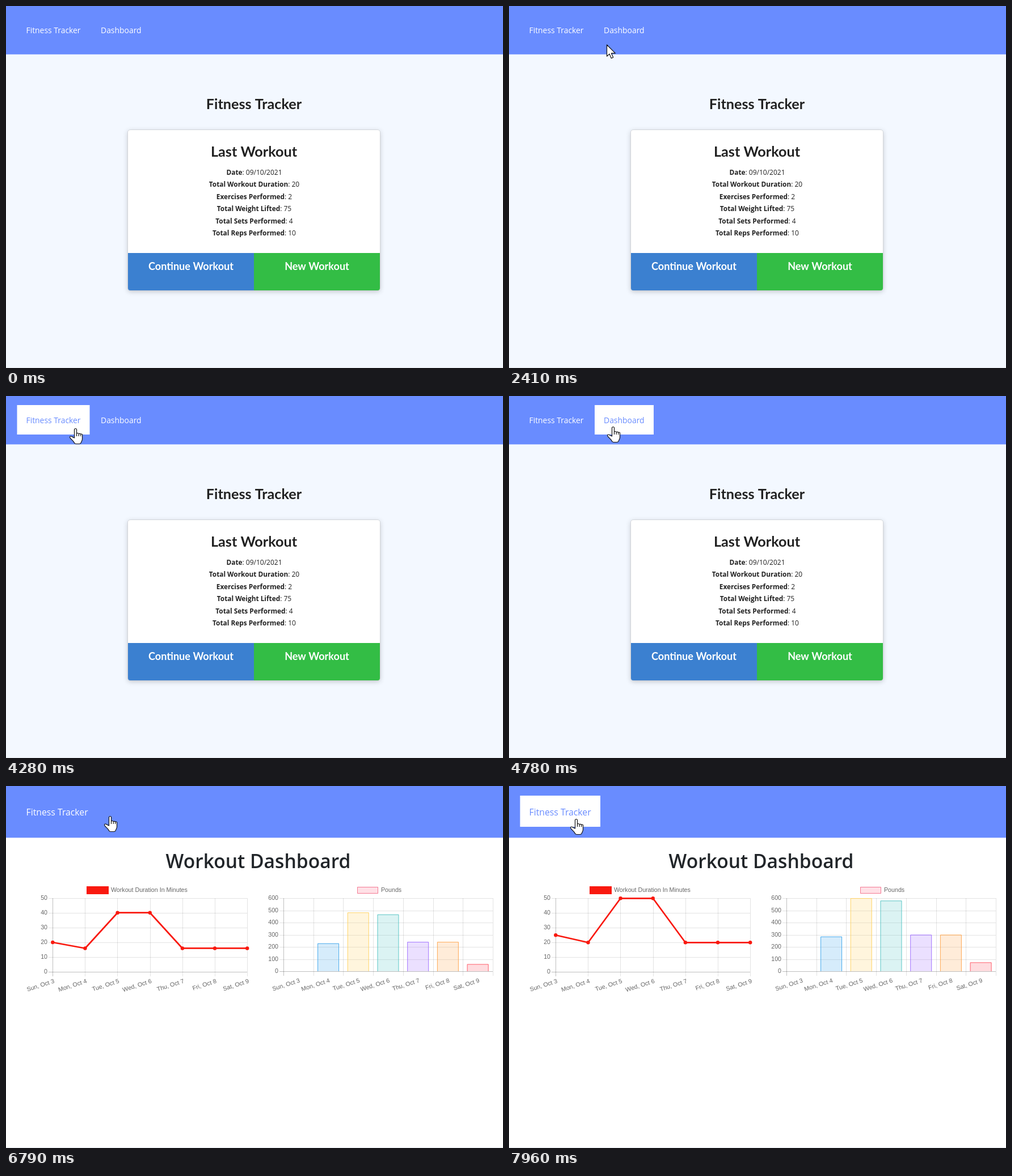
An HTML page with a canvas for the animation above (8 s loop, 876 px wide and 639 px high).

```html
<!DOCTYPE html>
<html lang="en">
<head>
<meta charset="utf-8">
<title>Fitness Tracker</title>
<style>
  html, body { margin: 0; width: 100%; height: 100%; overflow: hidden; }
  canvas { display: block; }
</style>
</head>
<body>
<canvas id="stage" width="876" height="639"></canvas>
<script>
const ctx = document.getElementById('stage').getContext('2d');
const LOOP = 8000, DASHBOARD_AT = 5900, CHARTS_AT = 6430, GROW_AT = 6445, GROW_MS = 1000;
const BLUE = '#698cff', INK = '#212121';
const SANS = '"Open Sans", sans-serif', LATO = 'Lato, sans-serif';
const CHART_FONT = '10.67px "Liberation Sans", Arial, sans-serif';

// The screen refreshes in bursts: first update, last update, number of updates
const BURSTS = [
  [250, 1000, 12], [1070, 1600, 7], [1930, 2410, 7], [2480, 2680, 4], [2750, 3150, 7],
  [3480, 3750, 4], [3950, 4210, 2], [4210, 4780, 9], [6430, 7200, 12], [7270, 7960, 10]
];
// Pointer stops: time, x, y
const POINTER = [
  [250, 802, 622], [460, 632, 482], [860, 322, 421], [1000, 233, 401],
  [1160, 175, 379], [1300, 139, 420], [1420, 148, 476], [1600, 170, 396],
  [1860, 170, 396], [2240, 188, 115], [2410, 172, 68], [2480, 165, 55],
  [2600, 125, 40], [2680, 125, 38], [2820, 165, 34], [2950, 165, 32],
  [3150, 116, 38], [3410, 116, 38], [3480, 115, 25], [3750, 114, 57],
  [3950, 115, 57], [4140, 115, 57], [4780, 183, 54],
  [6360, 183, 54], [6430, 183, 53], [7200, 183, 53], [7500, 145, 60], [7960, 118, 58]
];
const ARROW = new Path2D('M.5 .5V20.8L5 16.6L8.3 24.2L11.7 22.7L8.4 15.4H15.3Z');
const HAND = new Path2D('M8.5 17V2.5a2 2 0 0 1 4 0V9.5a2 2 0 0 1 3.7 .6a2 2 0 0 1 3.5 .9a1.5 1.5 0 0 1 2.8 1.2V19c0 3-1.6 4-2.3 6.5q-1 2-3 2H11q-2 0-3-2.5C6.6 22 3.5 20.5 .8 16.6c-1-2 1.2-3.4 3-2Z');
const KNUCKLES = new Path2D('M12.5 9.5V14M16.2 10.5V14M19.7 11.5V14');

const STATS = [
  ['Date', '09/10/2021'], ['Total Workout Duration', 20], ['Exercises Performed', 2],
  ['Total Weight Lifted', 75], ['Total Sets Performed', 4], ['Total Reps Performed', 10]
];
const DAYS = ['Sun', 'Mon', 'Tue', 'Wed', 'Thu', 'Fri', 'Sat'].map((day, i) => `${day}, Oct ${i + 3}`);
const MINUTES = [25, 20, 50, 50, 20, 20, 20];
const POUNDS = [0, 285, 600, 580, 300, 300, 73];
const BAR_RGB = ['255,99,132', '54,162,235', '255,206,86', '75,192,192', '153,102,255', '255,159,64', '255,80,95'];

function rect(x, y, w, h, fill) {
  ctx.fillStyle = fill;
  ctx.fillRect(x, y, w, h);
}

function text(str, x, y, font, fill, align = 'left', baseline = 'alphabetic') {
  ctx.font = font;
  ctx.fillStyle = fill;
  ctx.textAlign = align;
  ctx.textBaseline = baseline;
  ctx.fillText(str, x, y);
}

function line(x1, y1, x2, y2, color) {
  ctx.strokeStyle = color;
  ctx.lineWidth = 1;
  ctx.beginPath();
  ctx.moveTo(x1, y1);
  ctx.lineTo(x2, y2);
  ctx.stroke();
}

const inside = (p, x, y, w, h) => p && p.x >= x && p.x < x + w && p.y >= y && p.y < y + h;

// Time of the latest screen refresh
function refreshTime(t) {
  const burst = BURSTS.findLast(([first]) => first <= t);
  if (!burst) return 0;
  const [first, last, count] = burst, gap = (last - first) / (count - 1);
  return first + gap * Math.min(count - 1, Math.floor((t - first) / gap));
}

function pointerAt(t) {
  if (t < POINTER[0][0]) return null;
  const next = POINTER.findIndex(stop => stop[0] > t);
  if (next < 0) {
    const [, x, y] = POINTER[POINTER.length - 1];
    return { x, y };
  }
  const [t0, x0, y0] = POINTER[next - 1], [t1, x1, y1] = POINTER[next];
  const k = (t - t0) / (t1 - t0);
  return { x: x0 + (x1 - x0) * k, y: y0 + (y1 - y0) * k };
}

// Links and buttons return true while the pointer is over them
function navLink(label, x, y, w, h, baseline, size, p) {
  const hover = inside(p, x, y, w, h);
  if (hover) rect(x, y, w, h, '#fff');
  text(label, x + 16, baseline, `${size}px ${SANS}`, hover ? BLUE : '#fff');
  return hover;
}

function button(label, x, fill, hoverFill, p) {
  const hover = inside(p, x, 436, 222, 66);
  rect(x, 436, 222, 66, hover ? hoverFill : fill);
  text(label, x + 111, 465.5, `bold 18.1px ${LATO}`, '#fff', 'center');
  return hover;
}

function stat([label, value], i) {
  const bold = `bold 11.85px ${SANS}`, plain = `12px ${SANS}`, rest = `: ${value}`;
  const y = 298 + i * 21.4;
  ctx.font = bold;
  const labelW = ctx.measureText(label).width;
  ctx.font = plain;
  const x = 437.5 - (labelW + ctx.measureText(rest).width) / 2;
  text(label, x, y, bold, INK);
  text(rest, x + labelW, y, plain, INK);
}

function homePage(p) {
  rect(0, 0, 876, 639, '#f3f8ff');
  rect(0, 0, 876, 85.4, BLUE);
  const links = [
    navLink('Fitness Tracker', 19.5, 16, 128, 52, 48, 13.9, p),
    navLink('Dashboard', 151, 16, 104, 52, 48, 13.9, p)
  ];
  text('Fitness Tracker', 437, 182, `bold 25.2px ${LATO}`, INK, 'center');

  ctx.save();
  ctx.beginPath();
  ctx.roundRect(215, 219, 444, 283, 4);
  ctx.shadowColor = 'rgba(34,36,38,.25)';
  ctx.shadowBlur = 8;
  ctx.shadowOffsetY = 2;
  ctx.fillStyle = '#fff';
  ctx.fill();
  ctx.shadowColor = 'transparent';
  ctx.strokeStyle = '#d0d2d6';
  ctx.lineWidth = 1.6;
  ctx.stroke();
  ctx.clip();
  rect(215, 219, 444, 283, '#fff');
  links.push(
    button('Continue Workout', 215, '#3b80d0', '#2f73c2', p),
    button('New Workout', 437, '#33bd45', '#29ad39', p)
  );
  ctx.restore();

  text('Last Workout', 437, 266, `bold 25.2px ${LATO}`, INK, 'center');
  STATS.forEach(stat);
  return links.includes(true);
}

function axes(left, right, bottom, max, step) {
  const color = 'rgba(0,0,0,.11)', zero = 'rgba(0,0,0,.25)', dx = (right - left) / 7;
  const isBar = max > 100, count = isBar ? 7 : 6;
  for (let v = 0; v <= max; v += step) {
    const y = Math.round(bottom - (bottom - 198) * v / max) + .5;
    line(left - 7, y, right, y, v ? color : zero);
    text(v, left - 9, y - .5, CHART_FONT, '#666', 'right', 'middle');
  }
  for (let i = 0; i <= count; i++) {
    const x = Math.round(left + (right - left) * i / count) + .5;
    line(x, 198, x, bottom + 8, i ? color : zero);
  }
  DAYS.forEach((day, i) => {
    ctx.save();
    ctx.translate(isBar ? left + dx * (i + .5) + 2.5 : left + (right - left) * i / 6 + 3, bottom + 16.5);
    ctx.rotate(-.31);
    text(day, 0, 0, CHART_FONT, '#666', 'right', 'middle');
    ctx.restore();
  });
}

function lineChart(grow) {
  const red = '#f9190f';
  rect(142, 177, 39, 14, red);
  text('Workout Duration In Minutes', 185, 184, CHART_FONT, '#666', 'left', 'middle');
  axes(82, 425, 328, 50, 10);
  const points = MINUTES.map((v, i) => [82.3 + i * 57.15, 328.3 - v * 2.6 * grow]);
  ctx.strokeStyle = ctx.fillStyle = red;
  ctx.lineWidth = 2.7;
  ctx.lineJoin = 'round';
  ctx.beginPath();
  points.forEach(([x, y]) => ctx.lineTo(x, y));
  ctx.stroke();
  for (const [x, y] of points) {
    ctx.beginPath();
    ctx.arc(x, y, 3.2, 0, Math.PI * 2);
    ctx.fill();
  }
}

function barChart(grow) {
  rect(619, 178, 37, 12, 'rgba(255,99,132,.2)');
  ctx.strokeStyle = 'rgba(240,90,120,.75)';
  ctx.lineWidth = 1;
  ctx.strokeRect(619.5, 178.5, 36, 11);
  text('Pounds', 661, 184, CHART_FONT, '#666', 'left', 'middle');
  axes(489, 858, 327, 600, 100);
  POUNDS.forEach((v, i) => {
    if (!v) return;
    const x = 489 + 52.71 * (i + .5) - 19, h = 129 * v / 600 * grow, y = 327 - h;
    rect(x, y, 38, h, `rgba(${BAR_RGB[i]},.2)`);
    ctx.strokeStyle = `rgba(${BAR_RGB[i]},.85)`;
    ctx.beginPath();
    ctx.moveTo(x + .5, 327);
    ctx.lineTo(x + .5, y + .5);
    ctx.lineTo(x + 37.5, y + .5);
    ctx.lineTo(x + 37.5, 327);
    ctx.stroke();
  });
}

function dashboardPage(t, p) {
  rect(0, 0, 876, 639, '#fff');
  rect(0, 0, 876, 91.3, BLUE);
  const hover = navLink('Fitness Tracker', 19.5, 17, 141.5, 55, 51.5, 15.8, p);
  text('Workout Dashboard', 444.5, 145, `600 33.6px ${SANS}`, '#212529', 'center');
  if (t >= CHARTS_AT) {
    const k = Math.min(1, Math.max(0, (t - GROW_AT) / GROW_MS));
    const grow = 1 - (1 - k) ** 4;
    lineChart(grow);
    barChart(grow);
  }
  return hover || t < 7200; // the hand stays until the pointer moves again
}

function drawPointer({ x, y }, isHand) {
  ctx.save();
  ctx.translate(Math.round(x) - (isHand ? 10 : 0), Math.round(y));
  ctx.fillStyle = '#fff';
  ctx.strokeStyle = '#111';
  ctx.lineWidth = 1.2;
  ctx.lineJoin = 'round';
  const shape = isHand ? HAND : ARROW;
  ctx.fill(shape);
  ctx.stroke(shape);
  if (isHand) ctx.stroke(KNUCKLES);
  ctx.restore();
}

function draw(now) {
  const time = now % LOOP, t = refreshTime(time), p = pointerAt(t);
  const isHand = time < DASHBOARD_AT ? homePage(p) : dashboardPage(t, p);
  rect(0, 638, 876, 1, '#e6e9ee');
  if (p) drawPointer(p, isHand);
}

const start = performance.now();
function tick() {
  draw(performance.now() - start);
  requestAnimationFrame(tick);
}
tick();
</script>
</body>
</html>
```
